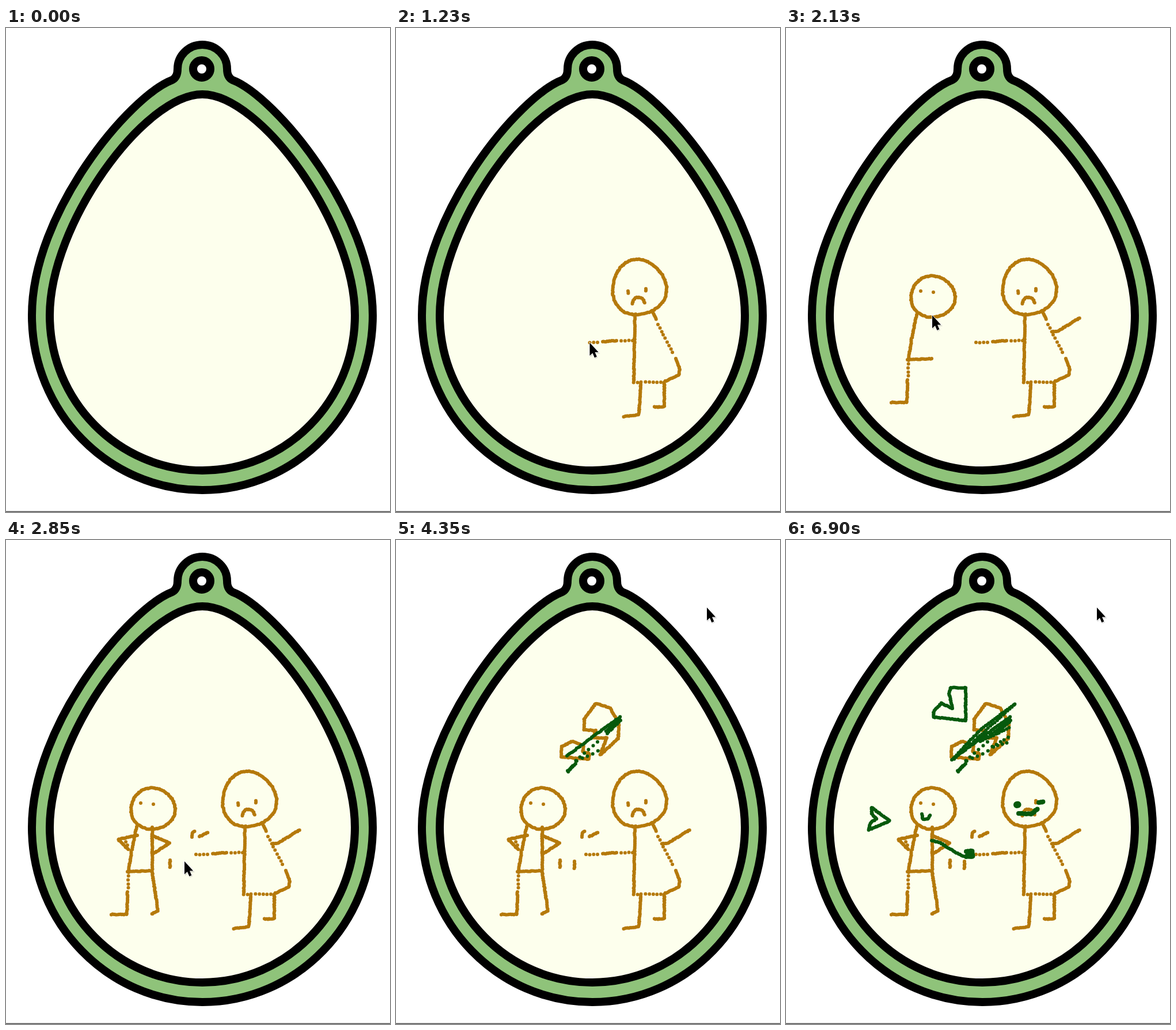
Recreate the animation shown at these times as an HTML page. Size 667 px wide and 839 px high, loop 6930 ms.

```html
<!DOCTYPE html>
<html lang="en">
<head>
<meta charset="utf-8">
<title>Egg drawing</title>
<style>
  html, body { margin: 0; width: 100%; height: 100%; overflow: hidden; background: #fff; }
  svg { display: block; width: 100vw; height: 100vh; }
</style>
</head>
<body>
<svg viewBox="0 0 667 839">
  <g stroke="#000" stroke-width="14" stroke-linejoin="round">
    <path fill="#8fc37a" d="M289 90Q298 85 298 71A43 42 0 0 1 384 71Q384 85 393 90C467 118 637 320 637 498C637 665 505 801 341 801C177 801 45 665 45 498C45 320 215 118 289 90Z"/>
    <path fill="#fdffed" d="M341 115C240 115 76 340 76 498C76 646 195 767 341 767C487 767 606 646 606 498C606 340 442 115 341 115Z"/>
    <circle cx="340" cy="71" r="15" fill="#fff"/>
  </g>
  <path d="M0 838.3H667" stroke="#555" stroke-width="1.4"/>
  <g id="ink" fill="none" stroke-linecap="round"></g>
  <g id="cursor" visibility="hidden">
    <path d="M1 3V25L6 20 9 28 14 26 11 19H18Z" opacity=".15"/>
    <path d="M0 0V22.5L5 18 8.4 26 12.4 24.3 9 16.5H15.2Z" stroke="#fff" stroke-width="1.4" paint-order="stroke"/>
  </g>
</svg>
<script>
const LOOP = 6930, STEP = 30;
const BROWN = '#b5790b', GREEN = '#06590c';
const REST = { x: 540, y: 117 };
const ink = document.getElementById('ink');
const cursor = document.getElementById('cursor');

let seed = 7;
const random = () => (seed = seed * 16807 % 2147483647) / 2147483647;
const jitter = size => (random() - 0.5) * size;
const distance = (a, b) => Math.hypot(b.x - a.x, b.y - a.y);
const mix = (a, b, p) => ({ x: a.x + (b.x - a.x) * p, y: a.y + (b.y - a.y) * p });
const progress = (t, a, b) => Math.min(1, Math.max(0, (t - a) / (b - a)));

// Pens: each returns { points, gap, width }
const toPoints = xy => xy.flatMap((x, i) => i % 2 ? [] : [{ x, y: xy[i + 1] }]);
const pen = (points, gap = 2, width = 6) => ({ points, gap, width });
const line = (...xy) => pen(toPoints(xy));
const dotted = (...xy) => pen(toPoints(xy), 6.8);
const marker = (...xy) => pen(toPoints(xy), 2, 8);
const eye = (x, y, height = 1) => line(x, y, x, y + height);
const leg = (hipX, hipY, ankleX, ankleY, toe, drop) =>
  line(hipX, hipY, ankleX, ankleY, ankleX + toe, ankleY + drop);

function arc(cx, cy, rx, ry, from, to, wobble = 0) {
  const points = [];
  for (let i = 0; i <= 24; i++) {
    const a = from + (to - from) * i / 24;
    const r = 1 + wobble * Math.cos(3 * a - Math.PI / 4);
    points.push({ x: cx + rx * r * Math.cos(a), y: cy + ry * r * Math.sin(a) });
  }
  return pen(points);
}
const head = (cx, cy, rx, ry, wobble) =>
  arc(cx, cy, rx, ry, -Math.PI / 2, -2.5 * Math.PI, wobble);

// Back and forth between two ends, sinking a little on every pass
function scribble(x1, y1, x2, y2, passes, gap, sink = 4) {
  const points = [];
  for (let i = 0; i <= passes; i++) {
    const shift = i * sink;
    const end = i % 2 ? { x: x2, y: y2 } : { x: x1, y: y1 };
    points.push({ x: end.x + shift * 0.4, y: end.y + shift });
  }
  return pen(points, gap);
}

const girl = () => [
  head(422, 450, 47, 48, 0.04),
  eye(403, 456, 5), eye(434, 452, 5),
  arc(421, 478, 10.5, 11, Math.PI, 2 * Math.PI),
  line(415, 500, 413, 614),
  line(445, 490, 452, 506), dotted(455, 514, 483, 567),
  line(486, 573, 493, 592, 491, 602, 466, 613), dotted(460, 614, 413, 614),
  leg(425, 617, 422, 670, -28, 4), leg(466, 614, 466, 657, -17, 0),
  dotted(411, 542, 389, 542), line(383, 542, 358, 544), dotted(350, 545, 327, 545)
];
const boyLeft = () => [
  line(464, 526, 473, 525, 511, 502),
  head(255, 466, 38.5, 36, 0.02),
  eye(234, 456), eye(256, 458),
  line(227, 497, 218, 540, 213, 572), dotted(213, 576, 212, 606),
  leg(211, 610, 210, 649, -28, 0),
  line(211, 575, 253, 573)
];
const boyRight = () => [
  line(254, 498, 254, 573), leg(254, 576, 264, 643, -12, 6),
  line(256, 513, 284, 525, 256, 544),
  line(228, 512, 195, 519, 213, 537), dotted(205, 517, 212, 533),
  line(323, 515, 324, 508, 328, 504), line(336, 514, 351, 507),
  eye(285, 555, 12), eye(310, 557, 13)
];
const brokenHeart = () => [
  line(347, 330, 327, 329, 327, 310, 347, 283, 372, 291, 387, 318, 386, 344, 355, 372, 366, 343, 342, 343, 347, 330),
  line(287, 376, 288, 358, 306, 349, 326, 356, 324, 367, 336, 370, 335, 380, 287, 376)
];
const firstScribble = () => [
  scribble(297, 374, 390, 306, 1, 3, 0),
  scribble(388, 309, 364, 330, 3, 4, 2),
  scribble(350, 350, 306, 378, 2, 10, 7),
  scribble(298, 400, 312, 386, 2, 3, 1)
];
const secondScribble = () => [
  scribble(288, 381, 340, 327, 1, 4, 0),
  scribble(340, 327, 398, 284, 1, 4, 0),
  scribble(396, 286, 291, 378, 1, 5, 2),
  scribble(388, 316, 334, 346, 2, 5, 4),
  scribble(386, 342, 354, 356, 2, 8, 4)
];
const greenHeart = () => [
  line(289, 292, 283, 264, 286, 256, 312, 256, 312, 313, 256, 307, 257, 296, 270, 283, 289, 292)
];
const happyFace = () => [
  pen(toPoints([401, 459, 403, 459]), 2, 12),
  marker(439, 455, 447, 454),
  marker(404, 474, 427, 475, 438, 465)
];
const reply = () => [
  line(236, 475, 237, 484, 246, 484, 251, 476),
  line(253, 521, 266, 524, 290, 539, 312, 550),
  marker(313, 540, 324, 539, 324, 549, 313, 549, 320, 543),
  line(149, 464, 180, 487, 143, 503, 147, 490, 158, 483, 149, 475, 149, 464)
];

function sampleDots({ points, gap }) {
  const dots = [points[0]];
  let carry = gap;
  for (let i = 1; i < points.length; i++) {
    const length = distance(points[i - 1], points[i]);
    for (; carry <= length; carry += gap) {
      const dot = mix(points[i - 1], points[i], carry / length);
      dots.push({ x: dot.x + jitter(1.2), y: dot.y + jitter(1.2) });
    }
    carry -= length;
  }
  return dots;
}

// Spread a group of strokes over a time span, by pen travel
function schedule(group, color, start, end) {
  let clock = 0, last = null;
  const strokes = group().map(stroke => {
    const dots = sampleDots(stroke);
    if (last) clock += 12 + distance(last, dots[0]) * 0.5;
    const from = clock;
    clock += 18 + dots.length * stroke.gap;
    last = dots[dots.length - 1];
    const path = document.createElementNS('http://www.w3.org/2000/svg', 'path');
    path.setAttribute('stroke', color);
    path.setAttribute('stroke-width', stroke.width);
    ink.append(path);
    return { dots, path, from, to: clock, shown: 0 };
  });
  const rate = (end - start) / clock;
  for (const s of strokes) {
    s.from = start + s.from * rate;
    s.to = start + s.to * rate;
  }
  return strokes;
}

// The cursor leads the brown strokes; the green ones appear without it
const led = [
  ...schedule(girl, BROWN, 40, 1236),
  ...schedule(boyLeft, BROWN, 1290, 2085),
  ...schedule(boyRight, BROWN, 2135, 2880),
  ...schedule(brokenHeart, BROWN, 2970, 3570)
];
const strokes = [
  ...led,
  ...schedule(firstScribble, GREEN, 3800, 4345),
  ...schedule(secondScribble, GREEN, 4410, 4880),
  ...schedule(greenHeart, GREEN, 4950, 5280),
  ...schedule(happyFace, GREEN, 5350, 5700),
  ...schedule(reply, GREEN, 5790, 6890)
];

function dotCount(s, t) {
  return t < s.from ? 0 : Math.max(1, Math.round(s.dots.length * progress(t, s.from, s.to)));
}

function cursorAt(t) {
  let last = led[0].dots[0], lastTime = 0;
  for (const s of led) {
    if (t < s.from) return mix(last, s.dots[0], progress(t, lastTime, s.from - 8));
    if (t < s.to) return s.dots[dotCount(s, t) - 1];
    last = s.dots[s.dots.length - 1];
    lastTime = s.to;
  }
  const p = progress(t, lastTime, lastTime + 210);
  return mix(last, REST, p * p * (3 - 2 * p));
}

function draw(t) {
  for (const s of strokes) {
    const count = dotCount(s, t);
    if (count === s.shown) continue;
    s.shown = count;
    s.path.setAttribute('d', s.dots.slice(0, count)
      .map(p => `M${p.x.toFixed(1)} ${p.y.toFixed(1)}h.01`).join(''));
  }
  const { x, y } = cursorAt(t);
  cursor.setAttribute('transform', `translate(${x.toFixed(1)} ${y.toFixed(1)})`);
  cursor.setAttribute('visibility', t < STEP ? 'hidden' : 'visible');
}

const origin = performance.now();
function tick() {
  const t = (performance.now() - origin) % LOOP;
  draw(Math.floor(t / STEP) * STEP);
  requestAnimationFrame(tick);
}
tick();
</script>
</body>
</html>
```
